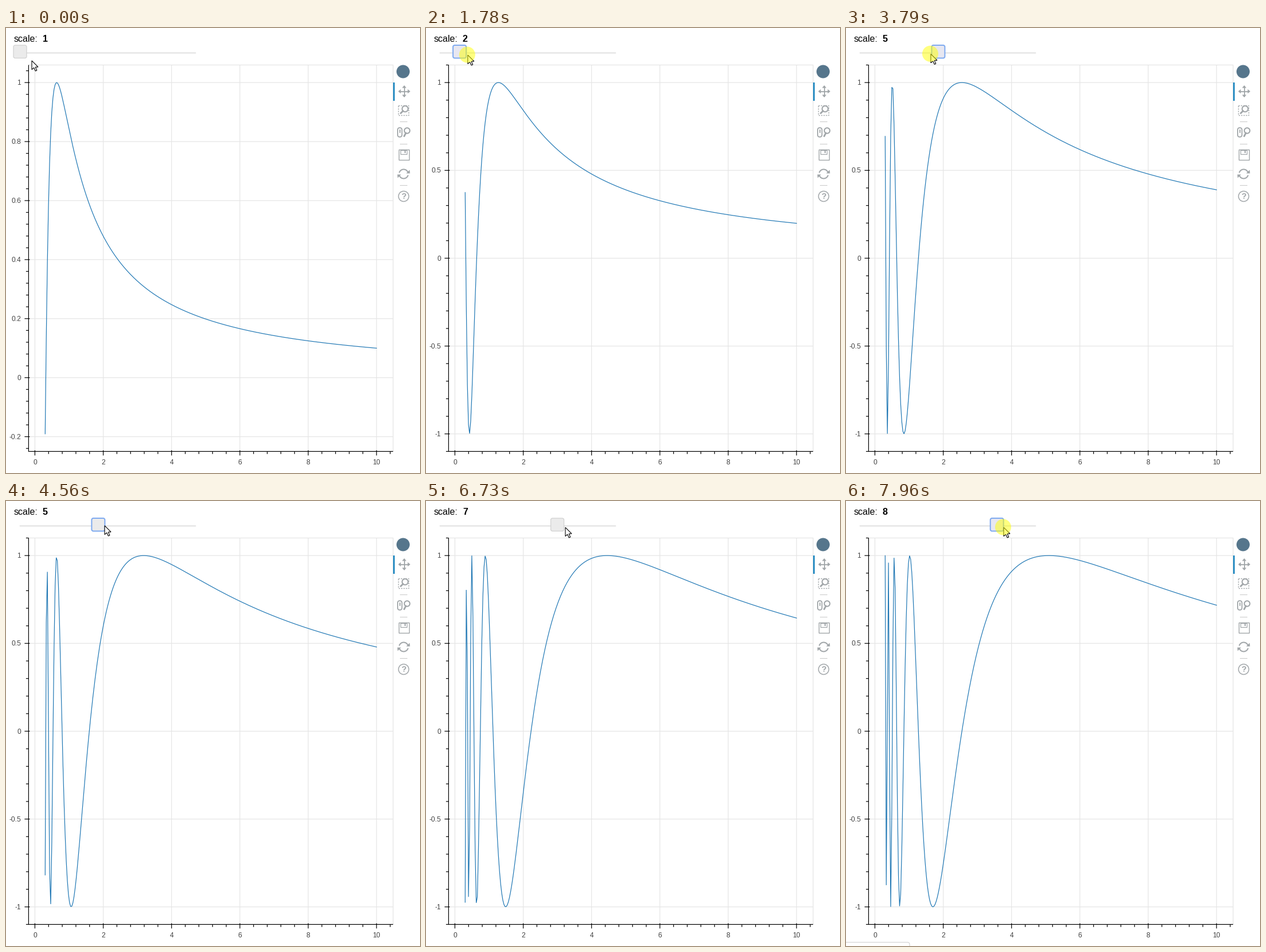
A matplotlib script for the animation above (8 s loop, 722x776 px).

```python
import math

import matplotlib.pyplot as plt
import numpy as np
from matplotlib.animation import FuncAnimation
from matplotlib.collections import LineCollection
from matplotlib.patches import Arc, Circle, FancyBboxPatch, Polygon, Rectangle

W, H, DPI = 722, 776, 100
LOOP, STEP = 8000, 40
PT = 72 / DPI
LEFT, RIGHT, TOP, BOTTOM = 39.4, 675.1, 64.5, 738.4
ICON, GRID, BLUE = "#a1a6a9", "#e5e5e5", "#1f77b4"

plt.rcParams["font.family"] = "Liberation Sans"
fig = plt.figure(figsize=(W / DPI, H / DPI), dpi=DPI, facecolor="white")
ax = fig.add_axes([0, 0, 1, 1])
ax.set_xlim(0, W)
ax.set_ylim(H, 0)
ax.axis("off")


def line(xs, ys, color, width=1.0, z=2, **kw):
    return ax.plot(xs, ys, color=color, lw=width * PT, zorder=z, **kw)[0]


def label(x, y, text, size, color="black", **kw):
    return ax.text(x, y, text, fontsize=size * PT, color=color, va="baseline", zorder=5, **kw)


def segments(color, z, lines=()):
    coll = LineCollection(lines, colors=color, linewidths=1.2 * PT, zorder=z, snap=False)
    ax.add_collection(coll, autolim=False)
    return coll


def shape(patch, face="none", edge="none", width=1.0, z=2):
    patch.set(facecolor=face, edgecolor=edge, linewidth=width * PT, zorder=z)
    return ax.add_patch(patch)


def rounded(x, y, w, h, r):
    return FancyBboxPatch((x, y), w, h, boxstyle=f"round,pad=0,rounding_size={r}")


def ticks(lo, hi, step):
    """Major and minor tick values inside a range, five minors per major."""
    minor = step / 5
    ks = range(math.ceil(lo / minor), math.floor(hi / minor) + 1)
    return ([k * minor for k in ks if k % 5 == 0],
            [k * minor for k in ks if k % 5])


# Data and horizontal axis
xs = np.linspace(0.3, 10, 300)
X_PAD = 0.05 * np.ptp(xs)
X_LO, X_HI = xs[0] - X_PAD, xs[-1] + X_PAD


def to_x(v):
    return LEFT + (v - X_LO) / (X_HI - X_LO) * (RIGHT - LEFT)


px = to_x(xs)
x_major, x_minor = ticks(X_LO, X_HI, 2)
segments(GRID, 1, [[(to_x(v), TOP), (to_x(v), BOTTOM)] for v in x_major])
segments(GRID, 1, [[(LEFT, TOP), (RIGHT, TOP), (RIGHT, BOTTOM)]])
segments("black", 4, [[(LEFT, TOP), (LEFT, BOTTOM), (RIGHT, BOTTOM)]]
         + [[(to_x(v), BOTTOM - 2), (to_x(v), BOTTOM + 7)] for v in x_major]
         + [[(to_x(v), BOTTOM), (to_x(v), BOTTOM + 4.5)] for v in x_minor])
for v in x_major:
    label(to_x(v), BOTTOM + 22.2, f"{v:g}", 12, "#444444", ha="center")

y_grid = segments(GRID, 1)
y_ticks = segments("black", 4)
y_labels = [label(26.3, 0, "", 12, "#444444", ha="right") for _ in range(7)]
curve = line([], [], BLUE, 1.2, z=3, solid_joinstyle="bevel")


def draw_plot(scale):
    ys = np.sin(scale / xs)
    full_swing = scale / xs[0] > 1.5 * math.pi
    low = -1 if full_swing else ys.min()
    pad = 0.05 * (1 - low)
    lo, hi = low - pad, 1 + pad

    def to_y(v):
        return TOP + (hi - v) / (hi - lo) * (BOTTOM - TOP)

    major, minor = ticks(lo, hi, 0.5 if full_swing else 0.2)
    rows = [to_y(v) for v in major]
    y_grid.set_segments([[(LEFT, r), (RIGHT, r)] for r in rows])
    y_ticks.set_segments(
        [[(LEFT - 7, r), (LEFT + 2, r)] for r in rows]
        + [[(LEFT - 4.5, to_y(v)), (LEFT, to_y(v))] for v in minor])
    for i, text in enumerate(y_labels):
        text.set_visible(i < len(major))
        if i < len(major):
            text.set_text(f"{round(major[i], 2):g}")
            text.set_y(rows[i] + 4.2)
    curve.set_data(px, to_y(ys))


# Toolbar
def magnifier(cx, cy, r, dx, dy):
    shape(Circle((cx, cy), r), "white", ICON, 2)
    k = r / math.hypot(dx, dy)
    line([cx + dx * k, cx + dx], [cy + dy * k, cy + dy], ICON, 2.8)


def draw_toolbar():
    shape(Circle((692.5, 76), 11.5), "#56768c")
    shape(Rectangle((675.3, 94.5), 3, 32), "#2e8fc4", z=5)

    centre = np.array([694.5, 110.5])
    for d in np.array([(1, 0), (-1, 0), (0, 1), (0, -1)]):
        tip, side = centre + 10.5 * d, 3.8 * d[::-1]
        line(*zip(centre, tip - 2 * d), ICON, 1.8)
        shape(Polygon([tip, tip - 4.5 * d + side, tip - 4.5 * d - side]), ICON)

    box = shape(Rectangle((684, 134.5), 17.5, 17.5), edge=ICON, width=1.4)
    box.set_linestyle((0, (1.6, 1.4)))
    magnifier(696, 141, 5.2, -7.5, 7.5)

    shape(rounded(683, 174, 7.5, 16, 3.7), edge=ICON, width=1.8)
    line([686.7, 686.7], [177.5, 181.5], ICON, 1.8)
    magnifier(699.5, 179, 4.8, -5, 9.5)

    shape(Rectangle((684.5, 212), 18, 18), edge=ICON, width=1.4)
    shape(Rectangle((688, 212.5), 11, 7), edge=ICON, width=1.2)
    shape(Rectangle((694.5, 213.5), 2.5, 4), ICON)

    for side in (1, -1):
        turn = 90 - 90 * side
        shape(Arc((693.5, 254.5), 16, 16, angle=turn, theta1=15, theta2=160),
              edge=ICON, width=2)
        head = np.array([(4.5, -1), (11, -1), (10.5, -7)]) * side
        shape(Polygon(head + (693.5, 254.5)), ICON)

    shape(Circle((693.5, 293.5), 9), edge=ICON, width=1.5)
    label(693.5, 298.3, "?", 14, ICON, ha="center", weight="bold")
    for y in (162.5, 201.5, 273.5):
        line([687, 699], [y, y], "#c8c8c8", 1)


draw_toolbar()

# Slider, pointer and status bubble
TRACK_X, NOTCH = 24.5, 34.1
label(13.5, 24, "scale:", 16)
value = label(64, 24, "1", 16, weight="bold")
line([24, 330], [42.5, 42.5], "#d6d6d6", 1.4)
handle = shape(rounded(0, 30, 23, 22.5, 3), z=5)
ARROW = np.array([(0, 0), (0, 15.5), (3.7, 12.2), (6.3, 18), (8.8, 16.9), (6.3, 11.2), (11, 11)])
pointer = shape(Polygon(ARROW), "white", "black", 1.1, z=6)
halo = shape(Circle((0, 0), 14), "#ffff00", z=7)
halo.set_alpha(0.5)
status = shape(rounded(-10, 769.5, 121, 30, 4), "white", "#d4d4d4", 1.2, z=8)

# Pointer stops (time, x, y), eased in between; the rest follows from the pointer
STOPS = np.array([(80, 45, 57), (385, 26, 46), (1630, 71, 47), (2940, 121, 48),
                  (4560, 172, 43), (5570, 214, 48), (6730, 243, 46), (7960, 275, 46)])
DRAGS = ((460, 2050), (2560, 4150), (4860, 5300), (6810, LOOP))
PLOT_LAG, FOCUS_HOLD, STATUS_AT = 600, 720, 7260


def pointer_at(t):
    k = np.interp(t, STOPS[:, 0], np.arange(len(STOPS)))
    i, u = int(k), k % 1
    nxt = min(i + 1, len(STOPS) - 1)
    return STOPS[i, 1:] + (STOPS[nxt, 1:] - STOPS[i, 1:]) * u * u * (3 - 2 * u)


def scale_at(t):
    """Slider value: the notch nearest to the pointer once it is grabbed."""
    if t < DRAGS[0][0]:
        return 1
    return 1 + round((pointer_at(t)[0] - TRACK_X) / NOTCH)


def update(i):
    t = i * STEP + STEP / 2
    tip = pointer_at(t)
    scale = scale_at(t)
    pressed = any(a <= t < b for a, b in DRAGS)
    focused = any(a <= t < b + FOCUS_HOLD for a, b in DRAGS)

    draw_plot(scale_at(t - PLOT_LAG))
    value.set_text(str(scale))
    handle.set_x(TRACK_X - 11.5 + NOTCH * (scale - 1))
    handle.set_facecolor("#e7e7f1" if pressed else "#ebebeb")
    handle.set_edgecolor("#7faaf0" if focused else "#d0d0d0")
    handle.set_linewidth((2 if focused else 1.2) * PT)
    halo.set_visible(pressed)
    halo.center = tip - (1, 0.5)
    pointer.set_xy(ARROW + tip)
    status.set_visible(t >= STATUS_AT)
    return ()


anim = FuncAnimation(fig, update, frames=LOOP // STEP, interval=STEP,
                     init_func=lambda: update(0), repeat=True, repeat_delay=0, blit=False)
plt.show()
```
